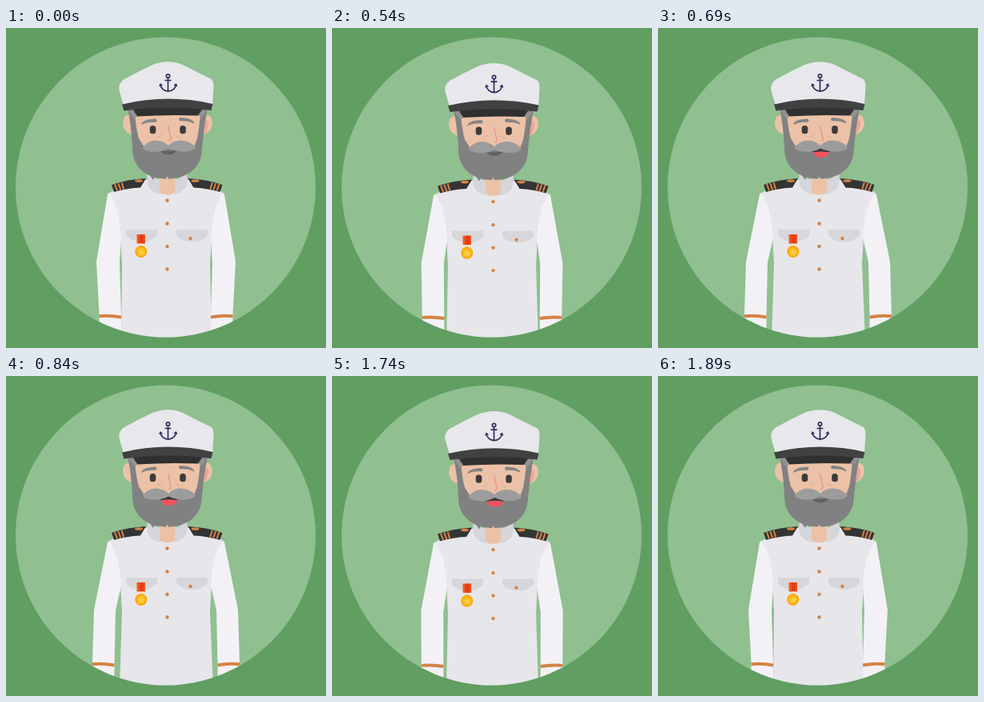
An HTML page that plays this animation: 400 by 400 pixels, repeating every 2.7 s.

```html
<!DOCTYPE html>
<html lang="en">
<head>
<meta charset="utf-8">
<title>Captain</title>
<style>
html, body { margin: 0; width: 100%; height: 100%; overflow: hidden; background: #619e62; }
svg { display: block; width: 100%; height: 100%; }
</style>
</head>
<body>
<svg viewBox="0 0 400 400">
  <defs>
    <clipPath id="disc"><circle cx="199.5" cy="199" r="187.5"/></clipPath>
    <g id="arm">
      <path class="sleeve" fill="#f3f1f6"/>
      <path class="cuff" fill="none" stroke="#d58244" stroke-width="4"/>
    </g>
    <g id="epaulette">
      <path d="M132 196Q152 189 175 188L168 199.500Q152 200 135 205Z" fill="#343434"/>
      <path d="M136 195l3 8.500M140.300 194l3 8.500M144.600 193l2.600 8.500" stroke="#d58244" stroke-width="2"/>
      <ellipse cx="166" cy="191" rx="5" ry="1.800" fill="#d58244"/>
    </g>
    <path id="collar" d="M177 180Q175 191 178 199Q184 206 192 208L192 190Q184 188 177 180Z" fill="#d6d6da"/>
    <path id="pocket" d="M150 252H189V259Q183 266 173 267H166Q156 266 150 259Z" fill="#d7d7db"/>
    <path id="ear" d="M158 109Q146 106 146 119Q147 131 159 133.500Z" fill="#ebc2a7"/>
    <path id="brow" d="M169 121Q170 114 187 113.500Q190 115.500 187 117.800Q176 117 169 121Z" fill="#848484"/>
    <linearGradient id="ribbon">
      <stop stop-color="#f4661f"/><stop offset=".6" stop-color="#e63314"/><stop offset="1" stop-color="#ee5a20"/>
    </linearGradient>
  </defs>

  <rect width="400" height="400" fill="#619e62"/>
  <circle cx="199.500" cy="199" r="187.500" fill="#90bf90"/>

  <g clip-path="url(#disc)">
    <g id="captain">
      <path id="torso" fill="#e7e6eb"/>
      <use href="#arm"/>
      <use href="#arm" transform="matrix(-1 0 0 1 400 0)"/>
      <use href="#epaulette"/>
      <use href="#epaulette" transform="matrix(-1 0 0 1 402.500 0)"/>
      <path d="M192 180H211V206Q201.500 211 192 206Z" fill="#ebc2a7"/>
      <use href="#collar"/>
      <use href="#collar" transform="matrix(-1 0 0 1 403 0)"/>

      <use href="#pocket"/>
      <use href="#pocket" x="63"/>
      <g fill="#d58244">
        <circle cx="201.500" cy="215.500" r="2.200"/>
        <circle cx="201.500" cy="244.500" r="2.200"/>
        <circle cx="201.500" cy="273" r="2.200"/>
        <circle cx="201.500" cy="301.500" r="2.200"/>
        <circle cx="230.500" cy="263" r="2.200"/>
      </g>

      <path d="M163.500 258h10.500v11.500h-10.500z" fill="url(#ribbon)"/>
      <path d="M167.500 269.500h3v3h-3z" fill="#f3dfb8"/>
      <circle cx="168.800" cy="279.500" r="7.500" fill="#fba80e"/>
      <circle cx="168.800" cy="279.500" r="5.400" fill="#fdbb1c"/>
      <path d="M169 275.500l1.300 3 3.200.3-2.400 2.100.7 3.200-2.800-1.700-2.800 1.700.7-3.200-2.400-2.100 3.200-.3z" fill="#fed04a"/>

      <use href="#ear"/>
      <use href="#ear" transform="matrix(-1 0 0 1 404 0)"/>
      <path d="M247 117Q252 113 253 118Q253 129 247 133Z" fill="#e9a596"/>

      <path d="M177 180L184 190L187 184Z" fill="#818181"/>
      <path d="M152 100H252Q247 125 245 150C245 178 223 188.500 201.500 188.500C180 188.500 158 178 158 150Q157 125 152 100Z" fill="#818181"/>
      <path d="M201.500 185.500l-2 4h4z" fill="#ebc2a7"/>
      <path d="M161 108H243Q241 128 239 138L235 149H173L166 138Q163 128 161 108Z" fill="#ebc2a7"/>
      <path d="M152 102L158 103L164 111L160 113ZM252 102L246 103L240 109L244 112Z" fill="#929292"/>

      <use href="#brow"/>
      <use href="#brow" transform="matrix(-1 0 0 1 404.500 -1.500)"/>
      <rect x="179.700" y="122" width="7.600" height="10.200" rx="3.500" fill="#3d3b3b"/>
      <rect x="217.200" y="122" width="7.600" height="10.200" rx="3.500" fill="#3d3b3b"/>
      <path d="M202.500 122L206 138Q207 141 203 141" fill="none" stroke="#e69a90" stroke-width="1.600"/>
      <path d="M194 132Q193 136 189 137M211 133Q213 137 217 137" fill="none" stroke="#daa78c" stroke-width="1"/>

      <path id="closedMouth" d="M192 152Q203 155 214 152Q211 158.500 203 158.500Q195 158.500 192 152Z" fill="#626262"/>
      <g id="openMouth">
        <path d="M192 155Q198 149 203 149Q209 149 215 155Z" fill="#3b3b3b"/>
        <path d="M194 155.500Q203 153.500 214 155.500Q212 162 204 162Q196 162 194 155.500Z" fill="#f4535d"/>
      </g>
      <path d="M170.500 150Q176 141 187 140.500Q197 140.500 203 147Q209 140 219 140.500Q231 141 237 149.500Q233 154 225 154.500Q213 155 203 150.500Q193 156 182 154.500Q174 154 170.500 150Z" fill="#9c9c9c"/>

      <path d="M158 100Q202 90 246 100L240 109.500Q202 108 164 110.500Z" fill="#303030"/>
      <path d="M147 97L141.500 78Q140 70 147 64.500Q164 55 181 47Q202 38 222 46.500Q240 56 256 63.500Q259.500 66 259.500 73L258 97Q202 84 147 97Z" fill="#e8e7ec"/>
      <path d="M145 95.500Q202 82 258.500 95L256.500 103Q202 96 147.500 103.500Z" fill="#404141"/>
      <g fill="none" stroke="#2d315f" stroke-width="1.700">
        <circle cx="202.500" cy="60" r="2.200"/>
        <path d="M202.500 62V79M198.500 65.500H206.500M193 70A9.700 9 0 0 0 212.500 70"/>
        <path d="M191.700 73L193 70L195.500 72M210 72L212.500 70L213.700 73" stroke-width="1.200"/>
      </g>
    </g>
  </g>
</svg>
<script>
const LOOP = 2700, STEP = 30, MOVE = 270, OPEN_AT = 420, CLOSE_AT = 1620;
const find = selector => document.querySelector(selector);
const captain = find('#captain'), torso = find('#torso');
const sleeve = find('.sleeve'), cuff = find('.cuff');
const closedMouth = find('#closedMouth'), openMouth = find('#openMouth');
const progress = (t, start) => Math.min(1, Math.max(0, (t - start) / MOVE));

function draw(time) {
  const t = Math.floor(time % LOOP / STEP) * STEP;
  const opening = progress(t, OPEN_AT), closing = progress(t, CLOSE_AT);
  const spread = opening - closing;
  const dip = 1.6 * (Math.sin(Math.PI * opening) + Math.sin(Math.PI * closing));

  const hand = 116.5 - 8.5 * spread;
  const elbow = 113 - 3 * spread;
  const innerElbow = 142 - 5 * spread;
  const hem = 144 - 2 * spread;

  captain.setAttribute('transform', `translate(0 ${dip})`);
  torso.setAttribute('d', `M177 189L134 203.5L128 207L143 260L145 295L${hem} 390
    H${401 - hem}L255 295L257 260L272 207L268 203.5L226 189Z`);
  sleeve.setAttribute('d', `M127 208L128.5 206Q141 220 144 262
    L${innerElbow} 293L${hand + 27.5} 360V390H${hand}V358L${elbow} 292Z`);
  cuff.setAttribute('d', `M${hand} 360.3Q${hand + 14} 359 ${hand + 27.5} 361.5`);

  const talking = spread > 0.5;
  openMouth.style.display = talking ? '' : 'none';
  closedMouth.style.display = talking ? 'none' : '';
}

function tick() {
  draw(performance.now());
  requestAnimationFrame(tick);
}
tick();
</script>
</body>
</html>
```
